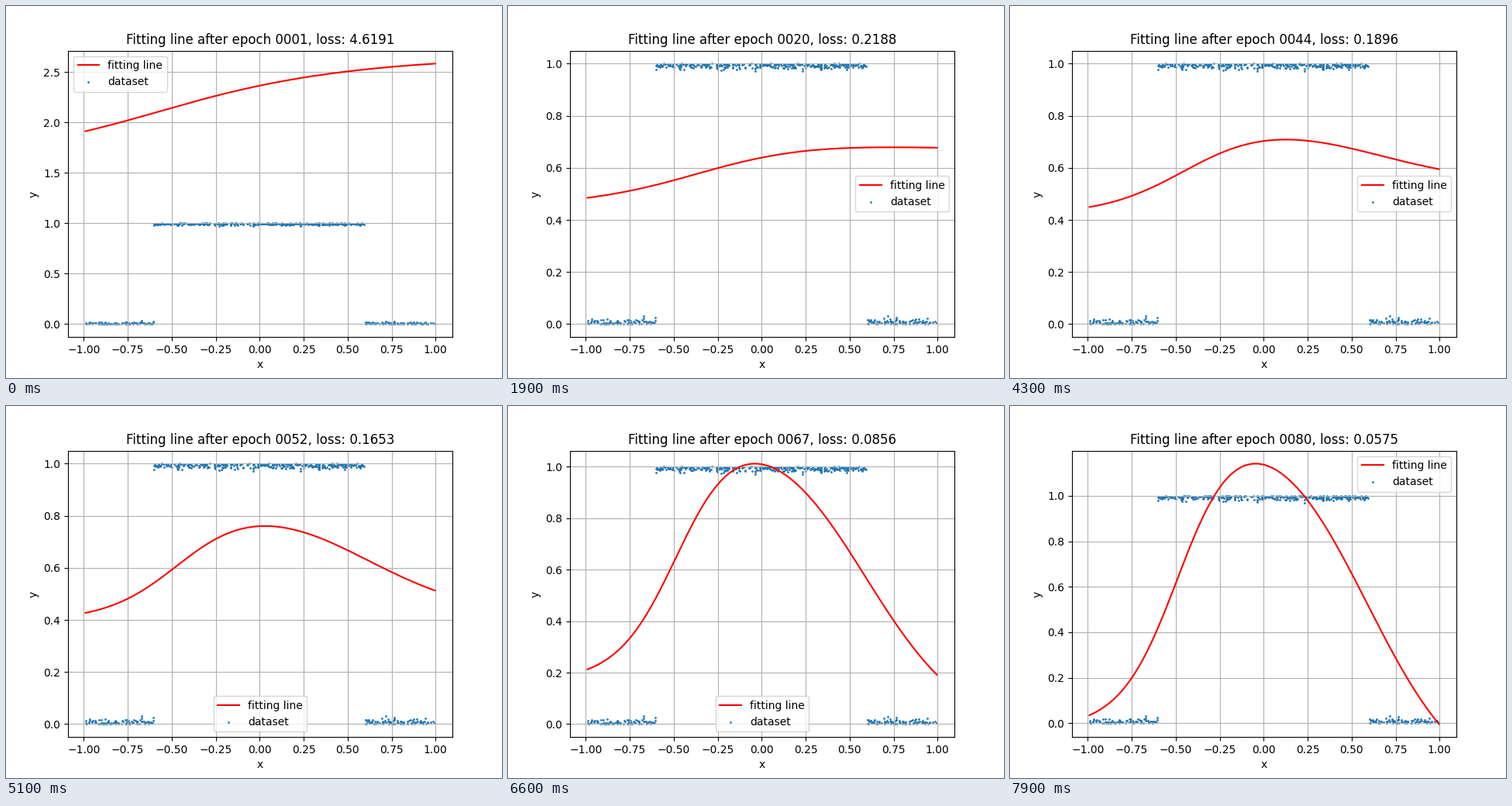
Write a matplotlib script that moves like this. It is 640 by 480 pixels and loops after 8000 ms.

```python
import matplotlib.pyplot as plt
import numpy as np
from matplotlib.animation import FuncAnimation

EPOCHS = 80
X_MIN, X_MAX = -0.9905, 0.9965
PINS = np.array([X_MIN, 0, X_MAX])

# epoch: curve height at the three pins, loss
FIRST = np.array([1.912, 2.364, 2.582, 4.6191])
KEYS = {
    20: (0.484, 0.638, 0.676, 0.2188),
    36: (0.463, 0.668, 0.643, 0.2051),
    52: (0.427, 0.760, 0.513, 0.1653),
    60: (0.335, 0.884, 0.345, 0.1200),
    72: (0.128, 1.081, 0.097, 0.0686),
    80: (0.035, 1.137, -0.004, 0.0575),
}


def make_dataset(n=500):
    """Box function with half-normal noise pointing into the box."""
    rng = np.random.default_rng(3)
    x = np.sort(rng.uniform(X_MIN, X_MAX, n))
    x[0], x[-1] = X_MIN, X_MAX
    noise = np.minimum(np.abs(rng.normal(0, 0.01, n)), 0.031)
    return x, np.where(np.abs(x) < 0.6, 1 - noise, noise)


def sigmoid(z):
    return 1 / (1 + np.exp(-z))


def smoothstep(t):
    t = np.clip(t, 0, 1)
    return t * t * (3 - 2 * t)


def monotone_slopes(t, v):
    """Harmonic-mean tangents, so the interpolation never overshoots."""
    d = np.diff(v, axis=0) / np.diff(t)[:, None]
    a, b = d[:-1], d[1:]
    same = a * b > 0
    mid = np.where(same, 2 * a * b / np.where(same, a + b, 1), 0)
    return np.vstack([d[:1], mid, d[-1:]])


key_rows = np.array(list(KEYS.values()))
start = key_rows[0] + 0.6 * (key_rows[0] - key_rows[1])
times = np.array([1, *KEYS], float)
rows = np.vstack([start, key_rows])
slopes = monotone_slopes(times, rows)


def settled(epoch):
    """Cubic Hermite interpolation between the key epochs."""
    i = min(np.searchsorted(times, epoch, side="right") - 1, len(times) - 2)
    h = times[i + 1] - times[i]
    s = (epoch - times[i]) / h
    bend = s * (1 - s) * ((1 - s) * slopes[i] - s * slopes[i + 1])
    return rows[i] + (rows[i + 1] - rows[i]) * smoothstep(s) + h * bend


def units(x, sharp, warm):
    """Bias, rising and falling unit; both steepen during training."""
    rise = sigmoid((3 + 3 * sharp - 0.8 * warm)
                   * (x + 0.35 + 0.13 * np.sqrt(sharp) + 0.25 * warm))
    fall = sigmoid((2.4 + 1.1 * sharp) * (x - 0.58))
    return np.column_stack([np.ones_like(x), rise, fall])


def model(epoch, x):
    """Fitted curve and loss after the given epoch."""
    warm = 0.68 ** (epoch - 1)
    sharp = smoothstep((epoch - 20) / 56)
    decay = np.array([warm, warm, warm, warm ** 2])
    *pins, loss = settled(epoch) + (FIRST - start) * decay
    weights = np.linalg.solve(units(PINS, sharp, warm), np.array(pins))
    return units(x, sharp, warm) @ weights, loss


x, y = make_dataset()
fig, ax = plt.subplots(figsize=(6.4, 4.8), dpi=100)


def draw(i):
    epoch = i + 1
    fit, loss = model(epoch, x)
    ax.clear()
    ax.plot(x, fit, color="red", label="fitting line")
    ax.scatter(x, y, s=1, label="dataset")
    ax.set_title(f"Fitting line after epoch {epoch:04d}, loss: {loss:.4f}")
    ax.set_xlabel("x")
    ax.set_ylabel("y")
    ax.grid(True)
    ax.legend(loc="best")
    return ax.get_children()


anim = FuncAnimation(fig, draw, frames=EPOCHS, init_func=lambda: [],
                     interval=100, repeat=True, repeat_delay=0)
plt.show()
```
